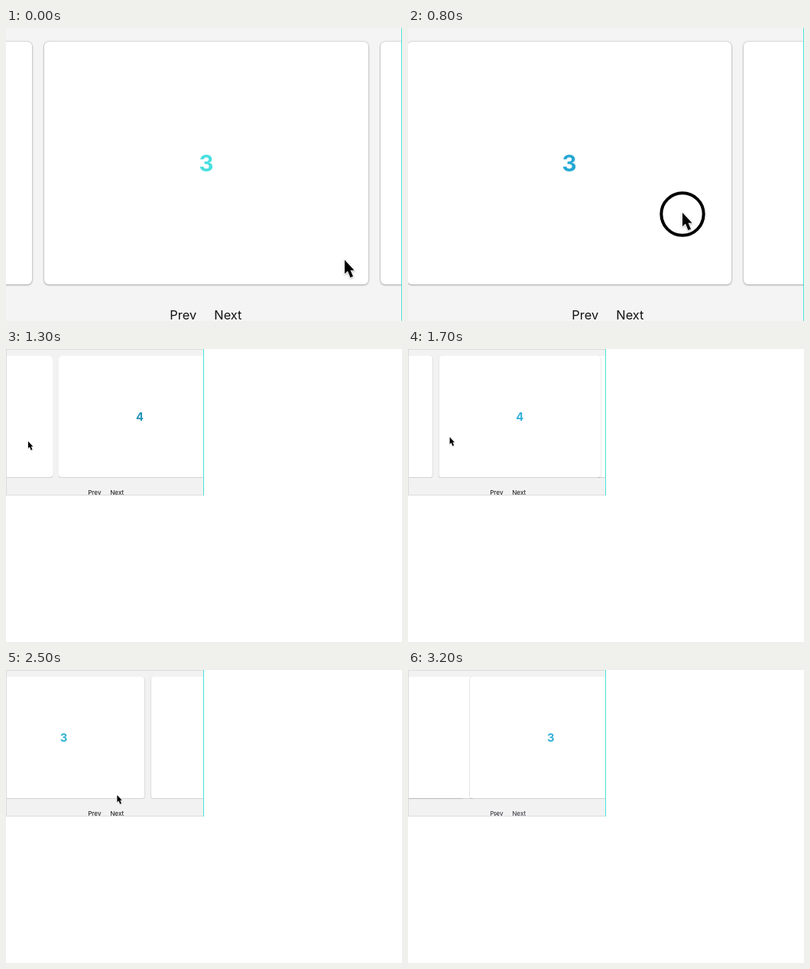
These frames come from a looping animation (518 px wide and 384 px high, 3300 ms). An HTML page:

```html
<!DOCTYPE html>
<html lang="en">
<head>
<meta charset="utf-8">
<title>Card slider</title>
<style>
  html, body { margin: 0; width: 100%; height: 100%; overflow: hidden; background: #fff; }
  svg { display: block; }
  text { font-family: Inter, Roboto, sans-serif; }
  .card { fill: #fff; filter: drop-shadow(0 0 .8px rgba(0, 0, 0, .25)) drop-shadow(0 1px 1px rgba(0, 0, 0, .25)); }
  .digit { font-size: 29.5px; font-weight: 700; text-anchor: middle; }
  .nav { font-size: 16.4px; }
  #arrow { paint-order: stroke; filter: drop-shadow(0 1px 1px rgba(0, 0, 0, .3)); }
</style>
</head>
<body>
<svg width="518" height="384" viewBox="0 0 518 384">
  <g id="view">
    <svg width="518" height="384">
      <rect id="back" width="518" height="384"/>
      <g id="track"></g>
      <g id="nav" class="nav">
        <text x="214.3" y="382.3">Prev</text>
        <text x="272.3" y="382.3">Next</text>
      </g>
      <circle id="ring" r="27.7" fill="none" stroke="#000" stroke-width="4"/>
      <path id="arrow" d="M0 0V18L4 14.5L7.5 23L11 21.5L7.5 13.5H12.5Z" stroke="#fff" stroke-width="1.6"/>
      <path id="hand" d="M228 386V381Q228 378 231.5 378T235 381V386" fill="#fff" stroke="#222" stroke-width="1.6"/>
      <path id="frame" d="M0 1H518M1 0V384M0 383H518" fill="none" stroke="#dcdcdc" stroke-width="2"/>
      <rect id="edge" height="384" fill="#4be3da"/>
    </svg>
  </g>
</svg>
<script>
const LOOP = 3300, STEP = 100;
const SHRINK = 1100, PRESS_1 = 500, DROP_1 = 1300, PRESS_2 = 1800, DROP_2 = 2200, ON_PREV = 2700, CLICK = 3000;
const CARD = { x: 50, y: 18, w: 424, h: 318, pitch: 440 };

const $ = id => document.getElementById(id);
const show = (el, on) => el.setAttribute('visibility', on ? 'visible' : 'hidden');
const place = (id, x, y) => $(id).setAttribute('transform', `translate(${x} ${y})`);

// Progress 0..1 between two times
const ramp = (t, from, to, power = 1) =>
  Math.min(1, Math.max(0, (t - from) / (to - from))) ** power;
const settle = (t, from, span) => 1 - (1 - ramp(t, from, from + span)) ** 1.25;

const drag = t => -352 * ramp(t, PRESS_1, DROP_1, 1.97) + 244 * ramp(t, PRESS_2, DROP_2, 1.2);

// Each release glides to the nearest card until the next press
const slide = t => drag(t)
  - 88 * settle(Math.min(t, PRESS_2), DROP_1, 700)
  + 178 * settle(Math.min(t, CLICK), DROP_2, 960)
  + 195 * ramp(t, CLICK, LOOP);

const pointerX = t => 443 - 33 * ramp(t, 0, PRESS_1) + drag(t)
  + 80 * ramp(t, DROP_1, PRESS_2, 2) - 152 * ramp(t, DROP_2, ON_PREV);
const pointerY = t => 304 - 62 * ramp(t, 0, 800) - 11 * ramp(t, DROP_1, 1700)
  + 20 * ramp(t, PRESS_2, DROP_2) + 128 * ramp(t, DROP_2, ON_PREV);

function ink(t) {
  const hue = 180 + 15 * ramp(t, 0, 800);
  const light = 58 - 15 * ramp(t, 0, DROP_1) + 10 * ramp(t, DROP_1, 1700);
  return `hsl(${hue} 70% ${light}%)`;
}

const left = n => CARD.x + (n - 3) * CARD.pitch;
const panel = (n, spread, name) =>
  `<rect class="${name}" x="${left(n) - spread}" y="${CARD.y}" width="${CARD.w + 2 * spread}" height="${CARD.h}" rx="6"/>`;
const card = n => panel(n, 0, 'card') +
  `<text class="digit" x="${left(n) + CARD.w / 2}" y="188">${n}</text>`;
// Outer panels reach under their neighbours in the small view
const wide = n => panel(n, 26, 'card wide');

$('track').innerHTML = card(2) + card(5) + wide(2) + wide(5) + card(3) + card(4);
const outer = document.querySelectorAll('.wide');

function draw(t) {
  const small = t >= SHRINK;
  const onPrev = t >= ON_PREV;
  const x = pointerX(t), y = pointerY(t);

  $('view').setAttribute('transform', `scale(${small ? .5 : 1})`);
  $('back').setAttribute('fill', small ? '#f2f2f2' : '#f4f4f4');
  $('track').setAttribute('fill', ink(t));
  $('nav').setAttribute('fill', onPrev ? '#2b2b36' : '#111');
  place('track', slide(t), 0);
  outer.forEach(panel => show(panel, small));

  place('arrow', x, y);
  place('ring', x, y + 2);
  show($('arrow'), !onPrev);
  show($('hand'), onPrev);
  show($('ring'), (t >= PRESS_1 && t < DROP_1) || (t > PRESS_2 && t < DROP_2));

  show($('frame'), small);
  const line = small ? 2 : 1;
  $('edge').setAttribute('x', 518 - line);
  $('edge').setAttribute('width', line);
}

const start = performance.now();
function tick() {
  const t = (performance.now() - start) % LOOP;
  draw(Math.floor(t / STEP) * STEP);
  requestAnimationFrame(tick);
}
tick();
</script>
</body>
</html>
```
